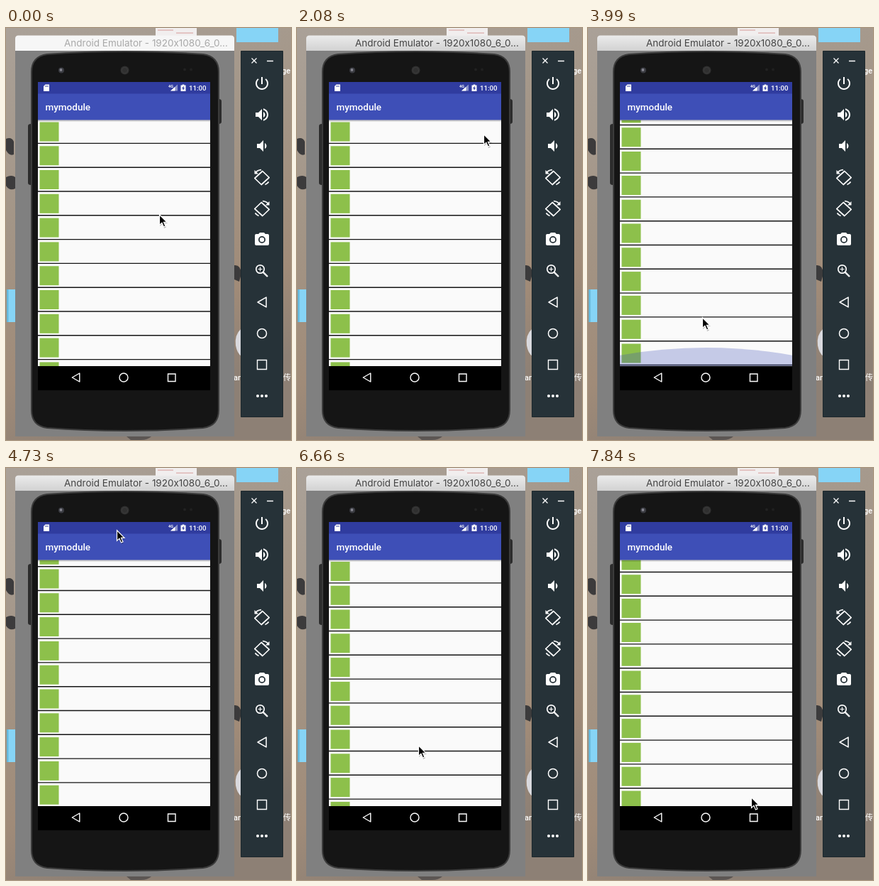
Animation, 402 px wide and 580 px high, one loop 7990 ms. Source, as an HTML page:

```html
<!DOCTYPE html>
<html lang="en">
<head>
<meta charset="utf-8">
<title>List pull demo</title>
<style>
html, body { margin: 0; width: 100%; height: 100%; overflow: hidden; background: #a3978b; }
svg { display: block; width: 402px; height: 580px; }
text { font-family: Roboto, Inter, sans-serif; }
.title { font: 13.5px Inter, sans-serif; }
.cjk { font-family: "Noto Sans CJK SC", "Noto Sans CJK", sans-serif; }
.line { fill: none; stroke: #fff; }
</style>
</head>
<body>
<svg viewBox="0 0 402 580">
  <defs>
    <linearGradient id="stone" x2="0.3" y2="1">
      <stop offset="0" stop-color="#aaa198"/>
      <stop offset=".45" stop-color="#a39586"/>
      <stop offset=".8" stop-color="#a08b78"/>
      <stop offset="1" stop-color="#8d8075"/>
    </linearGradient>
    <linearGradient id="bar" x2="0" y2="1">
      <stop offset="0" stop-color="#ebebeb"/><stop offset="1" stop-color="#d2d2d2"/>
    </linearGradient>
    <linearGradient id="shade" x2="0" y2="1">
      <stop offset="0" stop-opacity=".28"/><stop offset="1" stop-opacity="0"/>
    </linearGradient>
    <clipPath id="view"><path d="M45 129.5H288V476H45z"/></clipPath>
    <path id="back" d="M5.3-6V6L-5.2 0z" stroke-linejoin="round"/>
  </defs>

  <!-- desktop -->
  <path fill="url(#stone)" d="M0 0H402V580H0z"/>
  <g fill="#3c3b3c">
    <path d="M0 156Q8 153 11 160V178Q5 181 0 172z"/>
    <path d="M0 210Q8 206 13 210V226Q5 230 0 222z"/>
    <path d="M322 334Q331 333 332 346L329 357 322 354z"/>
    <path d="M170 575H205Q200 580 190 580H176z" opacity=".6"/>
  </g>
  <path fill="#86d4f6" d="M325 0H384V20H325zM1 368H13V414H1z"/>
  <path fill="#64b9dc" d="M1 368H3.5V414H1z"/>
  <path fill="#f1eeee" d="M211 0H269V11H211z"/>
  <path fill="none" stroke="#d69a98" d="M214 3H236M240 7H264"/>
  <path fill="#d9d9de" d="M332 423Q322 432 324 447 326 458 332 462z"/>
  <g fill="#fff" font-size="11" font-weight="500">
    <text x="389" y="64">ge</text>
    <text x="321" y="496">an</text>
    <text x="391" y="496" class="cjk">传</text>
  </g>

  <!-- emulator window -->
  <path fill="#808080" d="M13 31H322V575H13z"/>
  <path id="bar-bg" d="M13 32V15Q13 10.5 17.5 10.5H317.5Q322 10.5 322 15V32z"/>
  <text id="title" class="title" x="82" y="26">Android Emulator - 1920x1080_6_0...</text>

  <!-- phone -->
  <path fill="#2c2c2c" d="M31 138Q31 135 35 135V221Q31 221 31 218zM300 100Q304 100 304 103V132Q304 135 300 135z"/>
  <path fill="#151515" stroke="#3b3b3b" stroke-width="2"
    d="M36 62Q36 40 58 37 110 33 168 33T278 37Q300 40 300 62V538Q300 560 278 563 226 567 168 567T58 563Q36 560 36 538z"/>
  <circle cx="78" cy="59.5" r="4" fill="#3b3c42"/><circle cx="77.5" cy="59" r="1.9" fill="#85858f"/>
  <circle cx="167.5" cy="59.5" r="6" fill="#303030"/>
  <circle cx="167.5" cy="59.5" r="4" fill="none" stroke="#484848" stroke-dasharray="1 1"/>
  <circle cx="252" cy="58.5" r="2" fill="#222"/><circle cx="261" cy="58.5" r="2" fill="#202020"/>

  <!-- app -->
  <path fill="#fafafa" d="M45 129H288V476H45z"/>
  <g clip-path="url(#view)">
    <g id="rows"></g>
    <text id="more" class="cjk" x="166.5" text-anchor="middle" font-size="9.5" fill="#333">加载更多</text>
    <path id="glow" fill="#3f51b5"/>
  </g>
  <path fill="#303c9f" d="M45 76H288V93H45z"/>
  <path fill="#3e4fb7" d="M45 92.5H288V129.5H45z"/>
  <path fill="url(#shade)" d="M45 129.5H288V132.5H45z"/>
  <path fill="#000" d="M45 476H288V510H45z"/>
  <text x="55.5" y="116" font-size="13.5" font-weight="500" fill="#fff">mymodule</text>
  <g fill="#fff">
    <path d="M55.5 79.5H61V89H53V82z"/>
    <path stroke="#303c9f" stroke-width=".8" d="M55.7 81V83M57.4 81V83M59.1 81V83"/>
    <text x="229" y="83.5" font-size="5.5" font-weight="700">4G</text>
    <path d="M232 88.5L242 79.5V88.5z" opacity=".45"/><path d="M232 88.5L238.5 82.7V88.5z"/>
    <path d="M248.7 79.5H251.3V80.5H253.5V89H246.5V80.5H248.7z"/>
    <path fill="#303c9f" d="M250.7 81.5L248 85.3H249.6V88L252 84.3H250.5z"/>
    <text x="258" y="87.7" font-size="9.7" font-weight="500">11:00</text>
  </g>
  <g class="line" stroke-width="1.4">
    <use href="#back" x="98.5" y="492"/>
    <circle cx="166" cy="492" r="6"/>
    <path d="M228.5 487H239V497.500H228.5z"/>
  </g>

  <!-- side controls -->
  <path fill="#263238" stroke="#1d282d" d="M331.5 32.5H390.5V547.5H331.5z"/>
  <path class="line" stroke-width="1.3" d="M346.5 42.5L353.5 49.5M353.5 42.5L346.5 49.5M368 46.5H377"/>
  <g fill="#fff">
    <path transform="translate(349 66)" d="M13 3h-2v10h2V3zm4.83 2.17l-1.42 1.42C17.99 7.86 19 9.81 19 12c0 3.87-3.13 7-7 7s-7-3.13-7-7c0-2.19 1.01-4.14 2.58-5.42L6.17 5.17C4.23 6.82 3 9.26 3 12c0 4.97 4.03 9 9 9s9-4.03 9-9c0-2.74-1.23-5.18-3.17-6.83z"/>
    <path transform="translate(349 110)" d="M3 9v6h4l5 5V4L7 9H3zm13.5 3c0-1.77-1.02-3.29-2.5-4.03v8.05c1.48-.73 2.5-2.25 2.5-4.02zM14 3.23v2.06c2.89.86 5 3.54 5 6.71s-2.11 5.85-5 6.71v2.06c4.01-.91 7-4.49 7-8.77s-2.99-7.86-7-8.77z"/>
    <path transform="translate(349 154)" d="M18.5 12c0-1.77-1.02-3.29-2.5-4.03v8.05c1.48-.73 2.5-2.25 2.5-4.02zM5 9v6h4l5 5V4L9 9H5z"/>
    <path transform="translate(349 286)" fill-rule="evenodd" d="M9 2L7.17 4H4Q2 4 2 6V18Q2 20 4 20H20Q22 20 22 18V6Q22 4 20 4H16.83L15 2zM12 7a5 5 0 0 1 0 10a5 5 0 0 1 0-10z"/>
    <circle cx="361" cy="298" r="3.2"/>
    <circle cx="355" cy="518" r="2"/><circle cx="361" cy="518" r="2"/><circle cx="367" cy="518" r="2"/>
  </g>
  <g class="line" stroke-width="1.7">
    <g id="turn">
      <path d="M350.8 211.5L361.8 201.5 371.2 210.5 360.2 220.5z" stroke-linejoin="round"/>
      <path d="M352 203.5Q355 200 360 199.7M370.5 216.500Q369 219 365.5 220.500"/>
      <path stroke="none" fill="#fff" d="M350.5 200V205.5H356z"/>
    </g>
    <use href="#turn" transform="matrix(-1 0 0 1 722 44)"/>
    <circle cx="358.5" cy="339.5" r="5.7"/>
    <path d="M362.8 343.8L369 350" stroke-width="2.4"/>
    <path d="M355.5 339.5H361.5M358.5 336.5V342.5" stroke-width="1.2"/>
    <use href="#back" transform="translate(361 386) scale(1.15)" stroke-width="1.3"/>
    <circle cx="361" cy="430" r="6.5" stroke-width="1.5"/>
    <path d="M354.5 467.5H367.5V480.5H354.5z" stroke-width="1.4"/>
  </g>

  <g id="cursor">
    <path opacity=".25" d="M1 2V17L4.5 14 7 20 10 18.5 7.5 13H12z"/>
    <path stroke="#fff" stroke-width="1.2" d="M.5.8V15.4L3.9 12.2 6.5 18 9 16.9 6.5 11.3H11z"/>
  </g>
</svg>
<script>
const LOOP = 7990, STEP = 148, ROW = 33.8, FOOTER = 40, SLOP = 18, FLING_STEPS = 3;
const $ = id => document.getElementById(id);
const set = (id, attrs) => Object.entries(attrs).forEach(([k, v]) => $(id).setAttribute(k, v));
const clamp = (v, lo, hi) => Math.max(lo, Math.min(hi, v));
const endOf = rows => 162.4 + rows * ROW - 474.5;

// Straight mouse moves: first step, last step, where it ends.
const moves = [
  [0, 3, 224, 209], [5, 13, 263, 149], [14, 16, 353, 79], [17, 21, 175, 440],
  [21, 24, 164, 200], [24, 27, 161, 407], [27, 32, 156, 87], [32, 33, 156, 40],
  [33, 37, 163, 400], [37, 40, 157, 132], [40, 41, 157, 110], [41, 45, 171, 390],
  [45, 46, 174, 430], [46, 49, 208, 185], [49, 53, 230, 463]
];

// A drag moves the list with the mouse; on release it coasts on.
const drags = [
  { press: 21, release: 24, coast: 160, rows: 20 },
  { press: 27, release: 33, coast: 111, rows: FOOTER },
  { press: 37, release: 41, coast: 0, rows: FOOTER },
  { press: 41, release: 46, coast: -124, rows: FOOTER },
  { press: 49, release: 53, coast: 0, rows: FOOTER }
];

function mouse(step) {
  let x = 216, y = 262;
  for (const [from, to, toX, toY] of moves) {
    const f = clamp((step - from) / (to - from), 0, 1);
    x += (toX - x) * f;
    y += (toY - y) * f;
  }
  return { x, y };
}

function scrollAt(step) {
  let scroll = 0;
  for (const { press, release, coast, rows } of drags) {
    if (step < press) break;
    const pull = mouse(press).y - mouse(Math.min(step, release)).y;
    const rest = 1 - clamp((step - release) / FLING_STEPS, 0, 1);
    scroll += Math.sign(pull) * Math.max(0, Math.abs(pull) - SLOP) + coast * (1 - rest * rest);
    scroll = clamp(scroll, 0, endOf(rows));
  }
  return scroll;
}

const pulse = (step, mid) => Math.max(0, 1 - Math.abs(step - mid) / 2.2);

function drawRows(scroll) {
  let html = '';
  const first = Math.floor(scroll / ROW);
  for (let i = first; i < Math.min(first + 13, FOOTER); i++) {
    const y = 162.4 + i * ROW - scroll;
    html += `<path fill="#141414" d="M45 ${y - .7}h243v1.4h-243z"/>` +
            `<path fill="#8dc04b" d="M47.5 ${y - 30}h27v27h-27z"/>`;
  }
  $('rows').innerHTML = html;
  set('more', { y: 162.4 + FOOTER * ROW - scroll - 16.5 });
}

function drawGlow(step) {
  const h = 26 * pulse(step, 27) + 43.5 * pulse(step, 40);
  const edge = 476 - h * .59, top = 2 * (476 - h) - edge;
  set('glow', { d: `M45 476V${edge}Q166.5 ${top} 288 ${edge}V476z`, opacity: h * .011 });
}

function draw(ms) {
  const step = Math.min(53, Math.floor((ms + 12) / STEP));
  const { x, y } = mouse(step);
  const focused = step >= 14;
  drawRows(scrollAt(step));
  drawGlow(step);
  set('bar-bg', { fill: focused ? 'url(#bar)' : '#f6f6f6' });
  set('title', { fill: focused ? '#444' : '#a9a9a9' });
  set('cursor', { transform: `translate(${x} ${y})` });
}

const start = performance.now();
function tick() {
  draw((performance.now() - start) % LOOP);
  requestAnimationFrame(tick);
}
tick();
</script>
</body>
</html>
```
